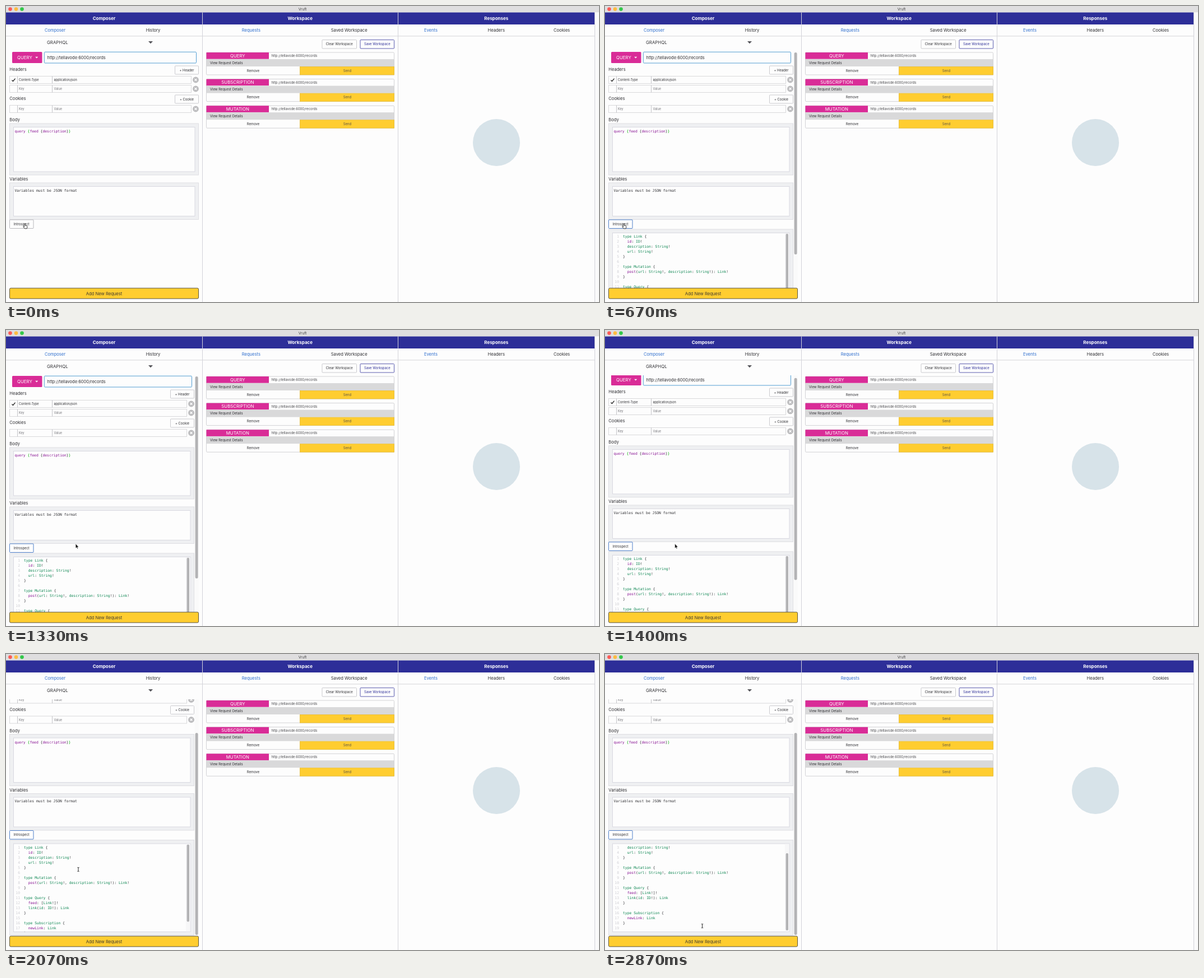
Animation of 1058x529 px, one loop 2.94 s. Source, as an HTML page:

```html
<!DOCTYPE html>
<html lang="en">
<head>
<meta charset="utf-8">
<title>Request composer</title>
<style>
  html, body { margin: 0; width: 100%; height: 100%; overflow: hidden; background: #fdfdfd; }
  svg { display: block; width: 100vw; height: 100vh; }
  text { font-family: Inter, "Open Sans", sans-serif; white-space: pre; }
  .mono { font-family: "DejaVu Sans Mono", monospace; }
</style>
</head>
<body>
<svg id="stage" viewBox="0 0 1058 529"></svg>
<script>
const LOOP = 2940, OPEN_AT = 370, PAGE_SCROLL = 66.5, CODE_SCROLL = 17.5;
const INK = '#2f2f33', BLUE = '#2f6fce', INDIGO = '#2d2e98', PINK = '#d92c97',
      YELLOW = '#ffcd30', LINE = '#d5d5d8', PAPER = '#fdfdfd', GREEN = '#0a8550', PURPLE = '#850d91';
const URL_TEXT = 'http://tellavode:6000/records';

// Rectangle given by its left, top, right and bottom edges
const box = (l, t, r, b, fill = PAPER, stroke = 'none', round = 0) =>
  `<rect x="${l}" y="${t}" width="${r - l}" height="${b - t}" rx="${round}" fill="${fill}" stroke="${stroke}" stroke-width=".9"/>`;
const path = (d, fill = 'none', stroke = 'none', width = 1) =>
  `<path d="${d}" fill="${fill}" stroke="${stroke}" stroke-width="${width}"/>`;
const disc = (x, y, r, fill) => `<circle cx="${x}" cy="${y}" r="${r}" fill="${fill}"/>`;
// Text centred vertically on y
const text = (x, y, str, size = 7.6, fill = INK, anchor = 'start', extra = '') =>
  `<text x="${x}" y="${y + size * .364}" font-size="${size}" fill="${fill}" text-anchor="${anchor}" ${extra}>${str}</text>`;
const mid = (x, y, str, size, fill, extra) => text(x, y, str, size, fill, 'middle', extra);
const mono = (x, y, str, fill, anchor) => text(x, y, str, 6.38, fill, anchor, 'class="mono"');
const span = (str, fill) => `<tspan fill="${fill}">${str}</tspan>`;
const button = (l, t, r, b, label, stroke = '#c6c6ca', fill = INK) =>
  box(l, t, r, b, PAPER, stroke, 1) + mid((l + r) / 2, (t + b) / 2, label, 5.9, fill);

const schema = `type Link {
  id: ID!
  description: String!
  url: String!
}

type Mutation {
  post(url: String!, description: String!): Link!
}

type Query {
  feed: [Link!]!
  link(id: ID!): Link
}

type Subscription {
  newLink: Link
}
`.split('\n');

const highlight = line => line.replace(/\w+/g, (word, at) =>
  span(word, at === 2 && /id|post|feed|newLink/.test(word) ? PURPLE : GREEN));

const codeLines = () => schema.map((line, i) => {
  const y = 412 + i * 9;
  return mono(25, y, i + 1, '#cfcfd4', 'end') + mono(32, y, highlight(line));
}).join('');

function fieldRow(y, right, key, value, checked) {
  const ink = checked ? INK : '#77777c', x = right + 8;
  return box(6.5, y - 6.5, right, y + 6.5, PAPER, LINE) +
    path(`M20.5 ${y - 6.5}v13M82.5 ${y - 6.5}v13`, 'none', '#c4c4c8') +
    (checked ? path(`M10.5 ${y + .5}l2 2 4-4.8`, 'none', '#222', 1.3) : '') +
    text(23, y, key, 5.5, ink) + text(85.5, y, value, 5.5, ink) +
    disc(x, y, 5.4, '#bcbcbe') + path(`M${x - 2} ${y - 2}l4 4m0-4l-4 4`, 'none', '#fff', 1.2);
}

const editor = (t, b, right) =>
  box(6.5, t, right, b, '#eff0f2', '#dcdce0') + box(13.5, t + 6.5, right - 6.5, b - 6, PAPER, '#d6d6de');

// Request form; inset makes room for the page scrollbar
function form(inset) {
  const right = 343.5 - inset;
  return box(11, 82, 64.5, 102, PINK, 'none', 1.5) + text(20, 92, 'QUERY', 7.85, '#fff') +
    path('M52.2 90.8h5l-2.5 2.7z', '#fff') +
    box(68.3, 82.2, right - 4, 102, PAPER, '#3f93cf', 1.5) + text(73.5, 92, URL_TEXT, 7.5) +
    text(6.3, 113.5, 'Headers') + button(right - 42, 107, right, 122, '+ Header') +
    fieldRow(132, right - 13, 'Content-Type', 'application/json', true) +
    fieldRow(148, right - 13, 'Key', 'Value') +
    text(6.3, 165.5, 'Cookies') + button(right - 42, 159, right, 174, '+ Cookie') +
    fieldRow(184, right - 13, 'Key', 'Value') +
    text(6.3, 203.3, 'Body') + editor(210, 302, right) +
    mono(15.5, 224, span('query', PURPLE) + span(' {', '#0a0') + span('feed', PURPLE) + ' {' +
      span('description', PURPLE) + '}' + span('}', '#0a0')) +
    text(6.3, 309.3, 'Variables') + editor(316, 381.5, right) +
    mono(15.5, 329.5, 'Variables must be JSON format') +
    button(6.5, 382, 49, 397.5, 'Introspect', inset ? '#3c72c4' : '#b0b0b6');
}

function column(left, right, title, tabs) {
  const step = (right - left) / tabs.length;
  return box(left, 11.5, right, 33, INDIGO) +
    mid((left + right) / 2, 22, title, 8, '#fff', 'font-weight="700"') +
    tabs.map((tab, i) => mid(left + step * (i + .5), 43.5, tab, 7.6, i ? INK : BLUE)).join('') +
    path(`M${left} 53.8H${right}`, 'none', LINE);
}

function card(y, kind) {
  return box(357.5, y, 692.5, y + 40, PAPER, '#cfcfd2', 1.5) + box(357.5, y, 469, y + 11.7, PINK) +
    mid(413.3, y + 6, kind, 7.85, '#fff') + text(473.5, y + 5.8, URL_TEXT, 5.9, '#4a4a4e') +
    box(357.8, y + 12, 692.3, y + 25, '#d9d9da') + text(364, y + 18.5, 'View Request Details', 5.9) +
    box(524.5, y + 25.5, 692.5, y + 40, YELLOW, '#e6bd3c') +
    mid(441, y + 32.7, 'Remove', 5.95) + mid(609, y + 32.7, 'Send', 5.95, '#5a5344');
}

const clip = (id, l, t, r, b) => `<clipPath id="${id}">${box(l, t, r, b)}</clipPath>`;
const cursors = {
  hand: path('M-.9 .9Q-.9 0 0 0T.9 .9V3.4L3.6 4.1Q4.7 4.5 4.5 5.8L3.7 9H-.2L-2.7 5.7Q-2.5 4.6-1.7 5.1L-.9 5.9Z', '#fff', '#111', .8),
  arrow: path('M0 0V8L1.8 6.4 3 9.1 4.3 8.5 3.1 5.9H5.5Z', '#111', '#fff', .5),
  beam: path('M-1.6-3.6Q0-3.6 0-2.6V2.6Q0 3.6-1.6 3.6M1.6-3.6Q0-3.6 0-2.6M0 2.6Q0 3.6 1.6 3.6', 'none', '#111', .9)
};

const stage = document.getElementById('stage');
stage.innerHTML =
  `<defs>${clip('page', 0, 81, 349, 504)}${clip('code', 13, 405.5, 329, 563)}</defs>` +
  box(0, 0, 1058, 529) + box(0, 0, 1058, 11.5, '#dfdedf') +
  disc(7.5, 5.6, 3.3, '#fc5b57') + disc(18, 5.6, 3.3, '#fdbc40') + disc(28.5, 5.6, 3.3, '#34c84a') +
  mid(529, 6, 'Vruft', 6.3, '#444') +
  column(0, 350, 'Composer', ['Composer', 'History']) +
  column(350, 699.5, 'Workspace', ['Requests', 'Saved Workspace']) +
  column(699.5, 1050, 'Responses', ['Events', 'Headers', 'Cookies']) +
  box(1050, 11.5, 1058, 529, '#fafafa') +
  path('M350.5 11.5V529M699.5 11.5V529M1050.5 11.5V529', 'none', '#d3d3da') +
  text(73, 64.7, 'GRAPHQL', 7.85) + path('M254 63h8l-4 4.3z', '#55555a') +
  button(564, 60.5, 625.5, 76, 'Clear Workspace') +
  button(632, 60.5, 692.5, 76, 'Save Workspace', '#4a4ba6', INDIGO) +
  ['QUERY', 'SUBSCRIPTION', 'MUTATION'].map((kind, i) => card(83 + i * 47.6, kind)).join('') +
  disc(875, 244, 42, '#d7e3e9') +
  `<g clip-path="url(#page)">
    <g id="closed">${form(0)}</g>
    <g id="open">
      <g id="scrolled">${form(8)}${editor(399, 569, 335.5)}
        <g clip-path="url(#code)"><g id="lines">${codeLines()}</g>
          ${box(321, 406, 328.6, 563, '#f7f7f8')}
          <g id="codeThumb">${box(322.6, 407, 327, 545, '#b3b3b5', 'none', 2)}</g></g>
      </g>
      ${box(336.5, 81, 343.5, 504, '#fafafa')}
      <g id="pageThumb">${box(337.6, 83, 342.6, 444, '#b3b3b5', 'none', 2.5)}</g>
    </g>
  </g>` +
  box(6.5, 504.2, 343.5, 523, YELLOW, '#4a4638', 2) + mid(175, 514, 'Add New Request', 7.65, '#3f3b30') +
  '<g id="cursor">' + Object.keys(cursors).map(name => `<g id="${name}">${cursors[name]}</g>`).join('') + '</g>';

const el = id => document.getElementById(id);
const show = (id, on) => el(id).style.display = on ? '' : 'none';
const move = (id, x, y) => el(id).setAttribute('transform', `translate(${x} ${y})`);
const ease = (t, from, to) => {
  const p = Math.min(1, Math.max(0, (t - from) / (to - from)));
  return p * p * (3 - 2 * p);
};

// Pointer stops: time, x, y
const stops = [[0, 33.5, 388.8], [880, 33.5, 388.8], [1330, 124.2, 382], [1630, 127.5, 382],
  [2070, 129, 385], [2430, 131.5, 391], [2870, 173.5, 486], [LOOP, 173.5, 486]];

function pointer(t) {
  const i = stops.findIndex(s => s[0] > t), [t0, x0, y0] = stops[i - 1], [t1, x1, y1] = stops[i];
  const p = ease(t, t0, t1);
  return [x0 + (x1 - x0) * p, y0 + (y1 - y0) * p];
}

function render() {
  const t = performance.now() % LOOP, open = t >= OPEN_AT;
  const page = ease(t, 1370, 1610), code = ease(t, 2130, 2380), [x, y] = pointer(t);
  show('closed', !open);
  show('open', open);
  move('scrolled', 0, -PAGE_SCROLL * page);
  move('pageThumb', 0, 58 * page);
  move('lines', 0, -CODE_SCROLL * code);
  move('codeThumb', 0, 15.6 * code);
  const shape = x < 49 ? 'hand' : y > 405.5 - PAGE_SCROLL * page ? 'beam' : 'arrow';
  for (const name in cursors) show(name, name === shape);
  move('cursor', x, y);
  requestAnimationFrame(render);
}
render();
</script>
</body>
</html>
```
